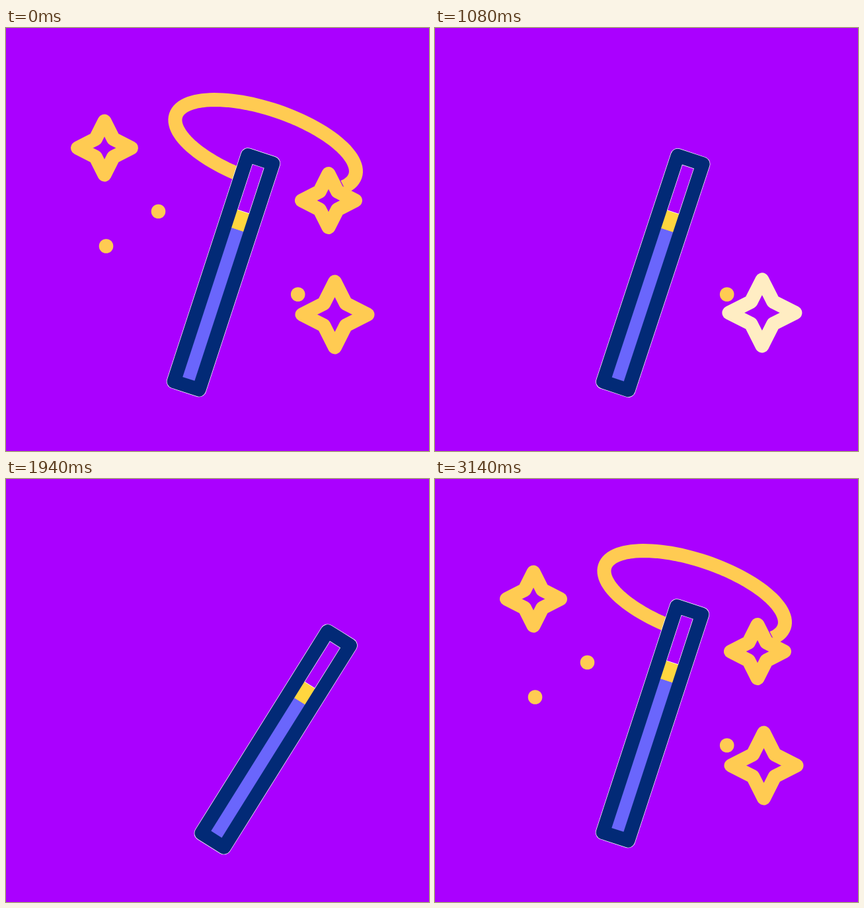
These frames come from a looping animation (640x640 px, 3.6 s). An HTML page:

```html
<!DOCTYPE html>
<html lang="en">
<head>
<meta charset="utf-8">
<title>Magic wand</title>
<style>
  html, body { margin: 0; width: 100%; height: 100%; overflow: hidden; background: #aa00ff; }
  svg { display: block; width: 100vw; height: 100vh; }
  .line { fill: none; stroke: #ffcb52; stroke-width: 21; }
  .star, #wand rect { stroke-linejoin: round; }
  .dot { fill: #ffcb52; }
</style>
</head>
<body>
<svg viewBox="0 0 640 640">
  <path id="trail" class="line"/>
  <g id="sparks"></g>
  <g id="wand">
    <rect x="-20" y="-180" width="40" height="360" fill="#aa00ff" stroke="#fff" stroke-width="22.4"/>
    <rect x="-10" y="-97.3" width="20" height="2" fill="#fff"/>
    <rect x="-10" y="-96.5" width="20" height="29" fill="#ffd63f"/>
    <rect x="-10" y="-68" width="20" height="238" fill="#6a66fc"/>
    <rect x="-20" y="-180" width="40" height="360" fill="none" stroke="#022a76" stroke-width="21"/>
  </g>
</svg>
<script>
const LOOP = 3600, TURN = 1500;      // sparks leave before TURN, return after it
const STAR_TIME = 400, DOT_TIME = 260;
const RAD = Math.PI / 180;
const $ = id => document.getElementById(id);
const ramp = (t, from, time) => Math.max(0, Math.min(1, (t - from) / time));

// Wand: time, centre x, centre y, tilt in degrees
const poses = [
  [1040, 329, 369.8, 18.1],
  [1310, 347.5, 384, 21.8],
  [1820, 379, 403, 28],
  [1940, 408, 394, 32],
  [2100, 434, 351, 27],
  [2320, 348.4, 288.2, 11.45],
  [2600, 271.8, 278, -3.7],
  [2900, 224, 328, 16],
  [3140, 329, 369.8, 18.1]
];

// Trail: tilted ellipse, drawn counter-clockwise from angle `start`
const ring = { x: 392.7, y: 178, a: 143.2, b: 55, tilt: 18.7, start: 22.6, sweep: 290 };

const stars = [
  { x: 149, y: 181.5, r: 40.5, drift: 9, out: 464, into: 2110 },
  { x: 488, y: 261, r: 40.5, drift: 5, out: 300, into: 1920 },
  { x: 497.5, y: 433.5, r: 49.5, drift: 4, out: 820, into: 2536 }
];
const dots = [
  { x: 230.5, y: 277.5, out: 300, into: 2800 },
  { x: 151.5, y: 330, out: 713, into: 2325 },
  { x: 441.7, y: 403, out: 1172, into: 2010 }
];

function add(tag, cls) {
  const el = document.createElementNS("http://www.w3.org/2000/svg", tag);
  el.setAttribute("class", cls);
  return $("sparks").appendChild(el);
}
stars.forEach(s => s.el = add("path", "line star"));
dots.forEach(d => d.el = add("circle", "dot"));

// Monotone cubic through column c of the poses, at rest on both ends
function pose(t, c) {
  let i = 0;
  while (i < poses.length - 2 && t > poses[i + 1][0]) i++;
  const slope = k => poses[k] && poses[k + 1]
    ? (poses[k + 1][c] - poses[k][c]) / (poses[k + 1][0] - poses[k][0]) : 0;
  const tangent = k => {
    const a = slope(k - 1), b = slope(k);
    return a * b <= 0 ? 0 : 2 * a * b / (a + b);
  };
  const h = poses[i + 1][0] - poses[i][0], u = ramp(t, poses[i][0], h);
  const p = poses[i][c], q = poses[i + 1][c];
  return p + (q - p) * u * u * (3 - 2 * u)
    + h * u * (1 - u) * ((1 - u) * tangent(i) - u * tangent(i + 1));
}

// Degrees travelled along the ring by the wand's tip
function travelled(x, y) {
  const dx = x - ring.x, dy = y - ring.y;
  const c = Math.cos(ring.tilt * RAD), s = Math.sin(ring.tilt * RAD);
  const angle = Math.atan2((dy * c - dx * s) / ring.b, (dx * c + dy * s) / ring.a) / RAD;
  const d = (ring.start - angle + 360) % 360;
  return d > 320 ? 0 : Math.min(d, ring.sweep);
}

function drawTrail(t, tipX, tipY) {
  let from = 0, to = ring.sweep;
  if (t < TURN) from = ring.sweep * ramp(t, 220, 520);
  else if (t < 1940) to = 0;
  else if (t < 3140) to = travelled(tipX, tipY);
  let d = "";
  for (let k = 0; k <= 90 && to > from; k++) {
    const u = (ring.start - from - (to - from) * k / 90) * RAD;
    d += (k ? "L" : "M") + ring.a * Math.cos(u) + " " + ring.b * Math.sin(u);
  }
  $("trail").setAttribute("d", d);
}
$("trail").setAttribute("transform", `translate(${ring.x} ${ring.y}) rotate(${ring.tilt})`);

function drawStar(s, t) {
  const leaving = t < TURN;
  const p = leaving ? 1 - ramp(t, s.out, STAR_TIME) : ramp(t, s.into, STAR_TIME);
  s.el.style.display = p > 0 ? "" : "none";
  // Swells past full size late when growing, midway when shrinking
  const swell = leaving ? .4 * Math.sin(Math.PI * p) : .317 * Math.sin(Math.PI * p ** 4);
  const scale = p ** .4 + swell;
  const x = s.x - s.drift * (1 - p), y = s.y - s.drift * (1 - p);
  let d = "";
  for (let i = 0; i < 8; i++) {
    const a = i * 45 * RAD, r = s.r * scale * (i % 2 ? .475 : 1);
    d += (i ? "L" : "M") + (x + r * Math.sin(a)) + " " + (y - r * Math.cos(a));
  }
  s.el.setAttribute("d", d + "Z");
  s.el.style.stroke = `rgb(255,${255 - 52 * p},${255 - 173 * p})`;
  s.el.style.strokeWidth = 21 * Math.min(1, scale * 3);
}

function drawDot(d, t) {
  const gone = t < TURN ? ramp(t, d.out, DOT_TIME) : 1 - ramp(t, d.into, DOT_TIME);
  d.el.setAttribute("cx", d.x);
  d.el.setAttribute("cy", d.y + 40 * gone * gone);
  d.el.setAttribute("r", 10.8 * (1 - ramp(gone, .58, .42)));
}

function draw(t) {
  const [x, y, tilt] = [1, 2, 3].map(c => pose(t, c));
  $("wand").setAttribute("transform", `translate(${x} ${y}) rotate(${tilt})`);
  drawTrail(t, x + 169.5 * Math.sin(tilt * RAD), y - 169.5 * Math.cos(tilt * RAD));
  stars.forEach(s => drawStar(s, t));
  dots.forEach(d => drawDot(d, t));
}

const start = performance.now();
function tick() {
  draw((performance.now() - start) % LOOP);
  requestAnimationFrame(tick);
}
tick();
</script>
</body>
</html>
```
